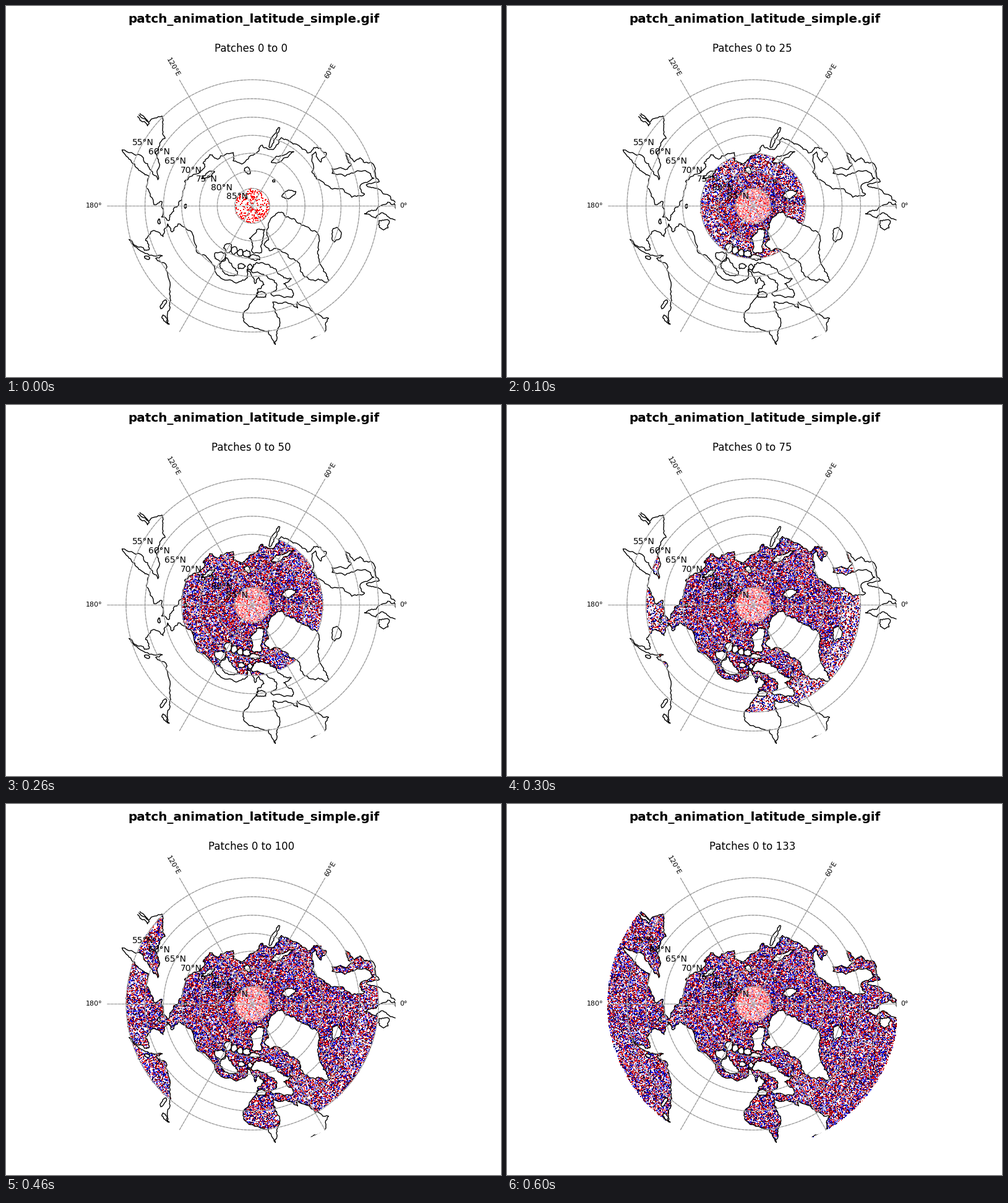
A matplotlib script that plays this animation: 800 px wide and 600 px high, repeating every 0.7 s.

```python
import numpy as np
import matplotlib.pyplot as plt
from matplotlib.animation import FuncAnimation
from matplotlib.collections import LineCollection
from matplotlib.patches import Polygon
from matplotlib.path import Path

plt.rcParams["font.family"] = "DejaVu Sans"
rng = np.random.default_rng(7)
CX, CY, SCALE, RIGHT = 398, 323.3, 647, 629.5


def radius(lat):
    return SCALE * np.tan(np.radians(90 - np.asarray(lat, float)) / 2)


def polar(r, deg):
    a = np.radians(deg)
    return np.stack([CX + r * np.cos(a), CY - r * np.sin(a)], -1)


def rough(pts, rounds=3):
    """Closed outline, bent at random between its corners."""
    pts = np.vstack([pts, pts[:1]])
    for _ in range(rounds):
        step = np.diff(pts, axis=0)
        size = np.hypot(*step.T)[:, None] + 1e-9
        normal = step[:, ::-1] * [1, -1] / size
        bend = rng.uniform(-1, 1, size.shape) * np.minimum(0.24 * size, 2.4)
        out = np.empty((2 * len(pts) - 1, 2))
        out[::2], out[1::2] = pts, (pts[:-1] + pts[1:]) / 2 + normal * bend
        pts = out
    return pts


lands = []


def land(*coast):
    """Land from a few (longitude, latitude) corners."""
    lon, lat = np.array(coast, float).T
    lands.append(rough(polar(radius(lat), lon)))


def island(x, y, a, b, tilt=0):
    """Ragged ellipse in pixels."""
    t = np.radians(np.arange(0, 360, 45))
    k = rng.uniform(0.75, 1.2, t.size)
    u, v, q = a * k * np.cos(t), b * k * np.sin(t), np.radians(tilt)
    lands.append(rough(np.stack([x + u * np.cos(q) + v * np.sin(q),
                                 y - u * np.sin(q) + v * np.cos(q)], -1), 2))


def far_side(start, stop):
    return [(lon, 30) for lon in np.linspace(start, stop, 12)]


asia = [
    (140.5, 50), (141, 53.2), (135.1, 54.7), (138, 56.5), (142.2, 59.2),
    (151.5, 59.2), (157, 61.7), (164.5, 62.5), (159.5, 59.2), (155.6, 56),
    (156.7, 51), (160, 54.4), (163, 57.8), (164, 59.9), (170.3, 60),
    (179.3, 62.4), (177.4, 64.6), (-173, 64.3), (-170, 66.1), (-175, 67.2),
    (-179.8, 68.9), (170.5, 70), (160, 69.6), (152, 71), (140, 72.5),
    (139, 71.5), (129.5, 71.1), (126.5, 73.5), (109.5, 73.9), (113, 76),
    (104, 77.7), (87, 75.1), (80.5, 72.5), (69.5, 72.9), (67, 69),
]
europe = [
    (60, 69), (53.5, 68.5), (44, 68.4), (43.5, 66.2), (40, 64.8), (35, 64.5),
    (32.5, 67), (40.5, 66.5), (40.5, 67.8), (30, 70.5), (23, 70.3),
    (14.8, 67.8), (11, 64.6), (5, 62), (6, 58.5), (10.5, 59.4), (12.8, 55.4),
    (16, 56.3), (18, 60), (17.8, 62.7), (22.2, 65.7), (25.3, 65.1),
    (21.3, 62), (22.8, 59.9), (29.9, 60), (23.4, 59), (24, 57.1),
    (21, 56.5), (19, 54.5), (10.8, 54.2), (10.5, 57.7), (8.2, 55.5),
    (4.4, 52.2), (1.6, 50.8), (1.5, 48),
]
land(*asia, *europe, *far_side(0, 140))

america = [
    (-125, 49), (-128, 52), (-130.5, 54.7), (-136, 58.2), (-146, 60.8),
    (-151.5, 59.3), (-151, 61.2), (-156, 57.4), (-164.8, 54.6), (-157.6, 57.5),
    (-157.2, 58.8), (-162, 58.7), (-166, 61.6), (-161, 63.5), (-168, 65.6),
    (-162, 66.2), (-166.4, 68.4), (-156.8, 71.3), (-141, 69.6), (-128, 70.4),
    (-115, 68), (-102, 67.7), (-95.5, 69), (-94.5, 72), (-88, 68),
    (-85, 69.7), (-81.5, 67.5), (-86.5, 66.3), (-87.5, 64.5), (-94.7, 60),
    (-92.5, 57), (-82.3, 55.1), (-80.5, 51.3), (-79, 54), (-76.6, 57),
    (-78, 62.4), (-70, 61), (-66, 58.8), (-65, 60.3), (-60, 55.3),
    (-55.8, 52.5), (-60, 50.1), (-61, 49.4), (-63.4, 49.9), (-66.3, 49.9),
    (-67, 49),
]
land(*america, *far_side(-67, -125))

greenland = [
    (-45, 60), (-42.6, 61.8), (-39.6, 65.5), (-31, 68.2), (-22.5, 70),
    (-21, 74), (-18.3, 77), (-19, 80), (-12, 81.4), (-33, 83.6),
    (-62, 81.2), (-65, 79.2), (-73, 78.3), (-69, 76.3), (-59, 75.6),
    (-54.5, 71.7), (-51, 69.5), (-53.7, 67), (-50, 62.5),
]
ellesmere = [(-62, 82.5), (-80, 83), (-95, 80.7), (-90, 78.8), (-88, 76.5),
             (-79, 76.4), (-73, 79.7)]
baffin = [
    (-81, 73.7), (-71, 71.2), (-67, 68.5), (-61.8, 66.7), (-68, 66.3),
    (-64.8, 63.2), (-66.3, 62), (-78, 64.5), (-73.5, 65.8), (-73.5, 68),
    (-80, 70), (-89.5, 71), (-89, 73.3),
]
britain = [(-5.5, 50), (1, 50.9), (1.6, 52.6), (-2, 55.6), (-2.5, 57.5),
           (-4, 58.6), (-5.6, 55.5), (-3, 54), (-5, 52)]
for outline in (greenland, ellesmere, baffin, britain):
    land(*outline)

for spec in [(533, 369, 12, 8, 80), (610, 353, 10, 8), (458, 304, 11, 7, 20),
             (445, 245, 20, 4, 25), (433, 283, 2, 2), (391, 266, 7, 4, -60),
             (327, 273, 11, 4, 30), (290, 324, 2, 4), (247, 349, 2, 4),
             (228, 407, 5, 3, -20), (254, 483, 9, 3, 60),
             (257, 507, 9, 3, -50), (413, 467, 9, 5), (359, 423, 17, 11, -40),
             (347, 405, 9, 8), (402, 407, 10, 4), (434, 212, 20, 3, 65),
             (222, 185, 13, 3, -40)]:
    island(*spec)
# Arctic archipelago: scattered along two parallels
for lat, west, east, count in [(76.2, -120, -97, 4), (72.6, -100, -92, 2)]:
    for lon in np.linspace(west, east, count):
        island(*polar(radius(lat), lon), *rng.uniform(4, 8, 2))

# Latitude bands: edges, first and last patch, dots per pixel
BANDS = [(85, 80, 1, 12, 0.7), (80, 75, 6, 38, 0.55), (75, 70, 26, 58, 0.55),
         (70, 65, 51, 74, 0.55), (65, 60, 62, 88, 0.5), (60, 55, 80, 106, 0.5),
         (55, 50, 101, 133, 0.5)]


def disc(n, r0, r1):
    return polar(np.sqrt(rng.uniform(r0**2, r1**2, n)), rng.uniform(0, 360, n))


rim = float(radius(85))
groups = [(disc(240, 0, rim), np.zeros(240), np.full(240, 0.75)),
          (disc(1700, 0, rim), np.ones(1700), rng.normal(0.58, 0.1, 1700))]
for top, low, first, last, density in BANDS:
    r0, r1 = radius(top), radius(low)
    n = int(np.pi * (r1**2 - r0**2) * density)
    groups.append((disc(n, r0, r1), rng.uniform(first, last, n),
                   rng.normal(0.5, 0.42, n)))
xy, patch, value = (np.concatenate(g) for g in zip(*groups))
sea = xy[:, 0] < RIGHT
for shape in lands:
    sea &= ~Path(shape).contains_points(xy)
xy, patch = xy[sea], patch[sea]
color = plt.get_cmap("seismic")(np.clip(value[sea], 0, 1))

fig = plt.figure(figsize=(8, 6), dpi=100, facecolor="white")
ax = fig.add_axes([0, 0, 1, 1])
ax.set(xlim=(0, 800), ylim=(600, 0))
ax.axis("off")

edge = polar(radius(50), np.linspace(0, 360, 361))
edge[:, 0] = np.minimum(edge[:, 0], RIGHT)
frame = Polygon(edge, fill=False, ec="none")
ax.add_patch(frame)


def draw_lines(paths, tint, width, style="-", z=2):
    lines = LineCollection(paths, colors=tint, linewidths=width,
                           linestyles=style, zorder=z)
    ax.add_collection(lines)
    lines.set_clip_path(frame)


dots = ax.scatter([], [], s=2, marker="s", linewidths=0, antialiased=False,
                  zorder=1)
draw_lines(lands, "black", 1)
grid = [polar(radius(lat), np.linspace(0, 360, 241))
        for lat in range(55, 90, 5)]
grid += [np.vstack([polar(radius(50), lon), [CX, CY]])
         for lon in range(0, 360, 60)]
draw_lines(grid, "#b8b8b8", 0.8, z=3)
draw_lines(grid, "#989898", 0.8, "--", z=3)


def label(x, y, text, size, **kw):
    kw = {"ha": "center", "va": "center", "zorder": 4, **kw}
    return ax.text(x, y, text, fontsize=size, **kw)


for lat in range(55, 90, 5):
    x, y = polar(radius(lat), 150)
    label(x, y - 0.7, f"{lat}°N", 10)
label(155.5, 323, "180°", 8, ha="right")
label(636.5, 323, "0°", 8, ha="left")
label(524, 105, "60°E", 8, rotation=60)
label(270, 99, "120°E", 8, rotation=-60)
label(400.5, 12, "patch_animation_latitude_simple.gif", 14.4, va="top",
      weight="bold")
title = label(396.2, 74.4, "", 12, va="baseline")


def draw(i):
    last = min(25 * i, 133)
    shown = patch <= last
    dots.set_offsets(xy[shown])
    dots.set_facecolors(color[shown])
    title.set_text(f"Patches 0 to {last}")
    return dots, title


anim = FuncAnimation(fig, draw, frames=7, interval=100, repeat=True,
                     repeat_delay=0)
plt.show()
```
